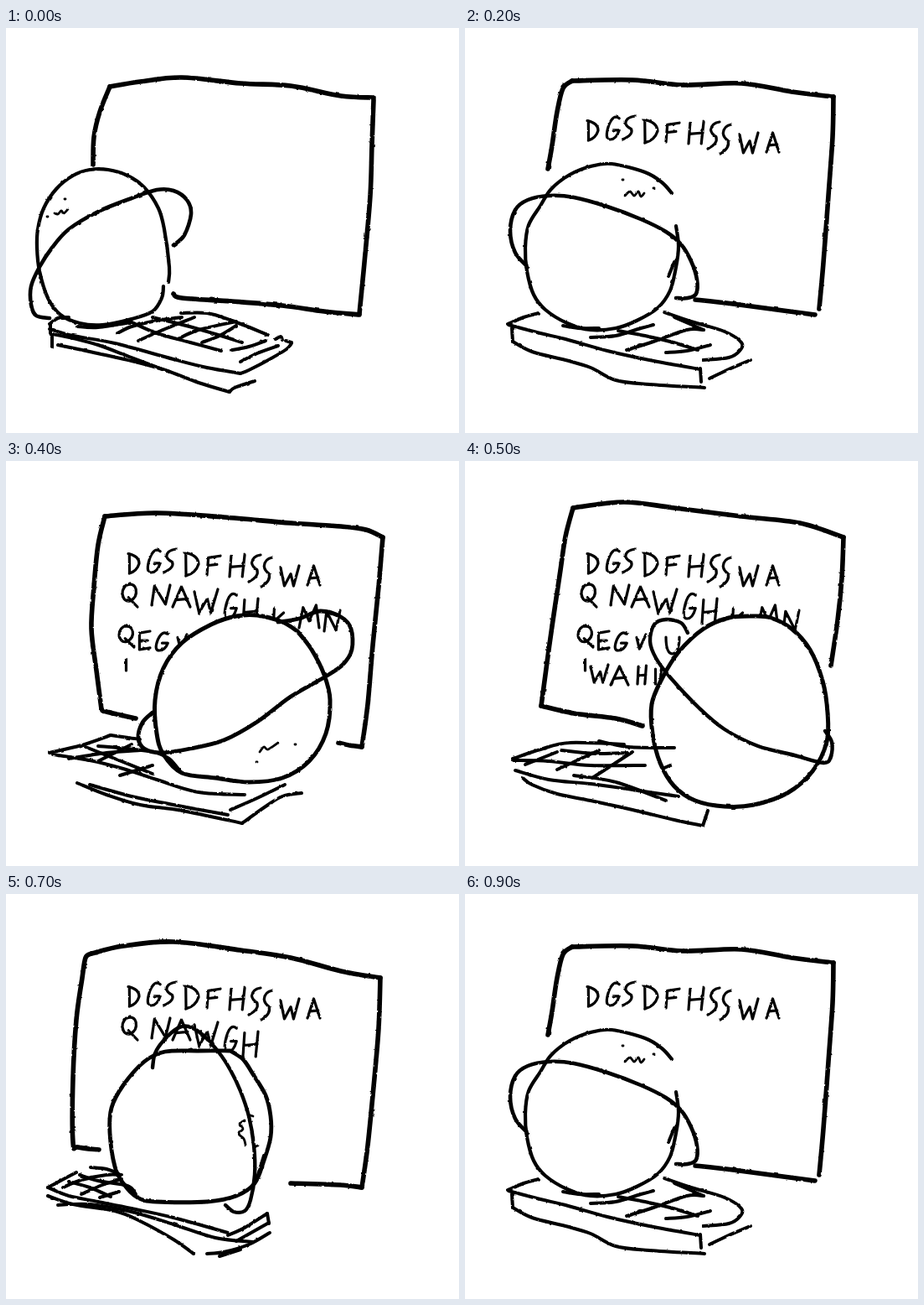
Recreate the animation shown at these times as an HTML page. Size 541 by 483 pixels, loop 1000 ms.

```html
<!DOCTYPE html>
<html lang="en">
<head>
<meta charset="utf-8">
<title>Typing doodle</title>
<style>
html, body { margin: 0; width: 100%; height: 100%; overflow: hidden; background: #fff; }
svg { display: block; width: 100%; height: 100%; }
path { fill: none; stroke: #000; stroke-linecap: round; stroke-linejoin: round; vector-effect: non-scaling-stroke; }
.head { fill: #fff; }
</style>
</head>
<body>
<svg id="stage" viewBox="0 0 541 483" role="img" aria-label="A round figure whirls over a keyboard: DGSDFHSSWA QNAWGHKMN QEGVU IWAHIK">
  <filter id="ink" x="0" y="0" width="541" height="483" filterUnits="userSpaceOnUse">
    <feTurbulence type="fractalNoise" baseFrequency=".16" numOctaves="2" seed="4"/>
    <feDisplacementMap in="SourceGraphic" scale="2.2" xChannelSelector="R" yChannelSelector="G"/>
  </filter>
</svg>
<script>
const NS = 'http://www.w3.org/2000/svg';
const stage = document.getElementById('stage');

// Strokes are runs of points; "|" lifts the pen.
const poses = {
  left: {
    letters: 0, headWidth: 4.2, ringWidth: 4.6,
    screen: `104,163 105,130 112,100 124,70|124,70 160,64 210,59 280,66 340,69 400,81 439,83|
      439,86 437,140 435,200 428,280 422,341|422,342 380,338 330,331 270,326 210,322 200,317`,
    head: `194,303 195,285 189,240 182,215 165,190 145,176 122,169 100,169 80,176 60,192 45,215
      38,240 37,262 40,290 50,322 65,342 88,352 115,354 150,347 175,338 186,322 188,308`,
    ring: `200,259 213,247 221,222 216,205 200,194 180,193 150,203 110,219 75,240 55,262 40,285
      30,308 30,330 36,343 52,346`,
    face: '70,204 71,204|49,225 50,225|58,221 62,222 66,218 69,221 74,216',
    keys: `52,353 62,346 75,345|52,359 80,367 130,376 200,395 240,405 280,412|
      280,412 290,408 315,395 335,383 341,376|53,353 53,364|55,368 55,381|
      62,378 100,386 150,397 190,408 230,423 267,434|267,434 273,429 297,421|
      55,365 80,370 110,378 150,393 195,410|209,340 240,340 270,349 313,366|
      148,350 180,364 220,375 257,385|175,345 215,355 250,365 282,375|133,364 150,356 180,349 210,345|
      158,373 185,361 225,345|205,371 230,360 275,350|234,375 255,367 275,355|
      270,384 290,380 310,373|280,398 300,388 325,379|322,371 328,368 330,372|334,373 341,375|85,356 110,357 150,351`
  },
  up: {
    letters: 10, headWidth: 4.2, ringWidth: 4.6,
    screen: `99,168 104,140 110,100 117,72 128,63|128,63 200,62 260,68 330,66 390,76 440,82|
      440,82 439,130 434,200 428,280 423,335|418,342 380,337 320,329 275,324`,
    head: `247,197 235,184 215,172 175,162 150,165 125,175 103,192 90,212 76,235 72,262 74,290
      82,318 96,336 122,352 150,360 180,358 205,349 230,334 245,313 252,285 255,260 252,236`,
    ring: `252,322 266,322 276,317 277,300 270,278 258,258 240,243 210,228 170,213 130,202 100,200
      75,205 60,217 54,242 60,268 75,285`,
    face: '188,181 189,181|225,191 226,191|191,200 197,195 202,200 207,195 210,201 214,197',
    keys: `51,353 70,345 88,340|52,354 90,364 120,371 170,385 220,396 281,407|56,358 57,374|
      57,374 80,386 120,396 150,405 180,420 220,425 286,429|281,406 282,422|292,418 315,407 341,396|
      238,339 270,350 310,362 330,375 328,385 315,393 285,396|250,345 285,360|117,355 135,358 160,358|
      150,369 180,367 210,358 225,354|183,361 215,367 245,374 278,384|193,384 225,374 265,360 285,360|
      240,387 265,385 293,378|243,296 250,279`
  },
  right: {
    letters: 16, headWidth: 4.8, ringWidth: 4.4,
    screen: `111,305 86,302 80,296 80,220 84,150 91,100 95,76 102,71|
      102,71 140,62 200,57 280,67 340,76 400,92 447,100|
      447,100 445,160 439,230 432,300 425,350|425,350 400,347 340,345`,
    head: `268,187 230,187 190,188 165,200 140,228 126,255 124,285 130,325 140,345 157,362 180,367
      240,367 275,360 297,345 308,318 316,290 316,265 310,240 295,215 283,197 268,187`,
    ring: `262,371 272,379 285,378 292,365 297,335 296,300 290,265 280,235 268,210 255,190 235,168
      218,158 205,160 188,175 178,190 175,207`,
    face: '292,264 295,265|298,301 301,300|285,270 279,274 283,280 278,286 284,292 286,299',
    keys: `84,332 65,342 50,350|50,350 75,360 110,367 150,375 200,386 265,404|101,326 120,328 135,334|
      88,335 110,342 145,348 155,358|75,343 100,350 125,361|68,350 90,341 120,335 138,335|
      90,358 115,347 138,340|112,362 135,355|50,360 80,370 130,378 160,390 200,412 224,429|
      62,371 100,370 150,379 200,394 250,410 295,415|265,407 285,398 312,381|312,381 314,393|
      275,414 314,392|240,429 260,427 290,418 315,404|255,432 280,424|300,338 308,312`
  },
  down: {
    letters: 25, headWidth: 5, ringWidth: 4.8,
    screen: `155,307 120,299 114,296|114,296 108,250 102,200 105,150 110,100 118,66|
      118,66 180,62 260,67 340,74 400,78 430,82 450,91|450,91 445,150 438,220 432,290 425,341|425,341 410,339 397,336`,
    head: `348,203 330,192 300,184 275,185 245,195 210,217 188,247 178,285 180,325 188,350 210,372
      250,378 290,383 330,378 362,358 382,325 387,285 380,255 365,225 348,203`,
    ring: `175,300 163,312 158,330 165,343 185,348 220,343 260,333 300,311 340,281 380,258 402,243
      413,225 412,200 400,186 375,179 350,188 325,192`,
    face: '299,359 300,359|345,338 346,338|303,347 308,341 313,344 325,336',
    keys: `52,348 90,339 125,327|125,327 160,332|56,350 100,357 140,367 180,380 230,395 285,398|
      75,355 120,348 160,345|110,340 145,343 178,347|95,341 130,355 175,373|136,375 175,363|
      110,358 150,338|85,384 120,398 160,410 210,417 282,432|100,386 150,400 200,410 265,422|
      268,416 300,402 333,386|282,432 310,412 330,400 353,396|178,347 195,355 208,370`
  },
  back: {
    letters: 30, headWidth: 5, ringWidth: 4.4,
    screen: `212,316 180,307 130,301 91,292|91,292 98,240 105,190 114,130 120,90 129,56|
      129,56 190,49 250,56 330,66 400,74 452,91|452,91 450,140 445,190 437,244`,
    head: `345,185 315,187 285,200 255,228 235,260 223,290 224,325 233,360 250,388 275,405 310,412
      345,410 385,396 415,370 432,335 433,300 427,262 412,225 390,200 365,187 345,185`,
    ring: `266,205 258,193 240,189 226,195 221,215 228,235 245,258 280,295 310,320 350,340 390,350
      428,360 437,352 438,335 430,322`,
    face: '',
    keys: `57,355 90,344 125,336 190,338|160,334 195,341 250,342|57,357 100,358 150,363 215,363|
      72,362 110,347|110,368 160,345|152,378 200,347|115,345 155,349 195,348|
      60,369 100,380 150,385 200,392 255,400|130,375 180,383 240,405|
      69,378 80,386 110,397 150,405 200,416 250,428 284,435|284,435 290,417|238,366 245,363`
  }
};

// Each glyph fills a unit box.
const glyphs = {
  D: 'M.1 .1L.12 1M0 .1Q1 .2 1 .55Q.8 .9 .1 1',
  G: 'M.9 .1Q.5 -.1 .2 .4Q-.1 1 .3 1Q.7 1 .9 .6L.5 .6',
  S: 'M1 0Q.3 .05 .25 .3Q.3 .45 .7 .55Q.9 .8 0 1',
  F: 'M.1 .1L0 1M.1 .1L1 0M.1 .5L.7 .45',
  H: 'M.1 .05L0 1M.95 0L.8 1M.05 .55L.9 .5',
  W: 'M0 .1L.2 1L.55 .4L.7 1L1 0',
  A: 'M0 1L.5 0L1 1M.2 .65L.85 .6',
  Q: 'M.5 0Q0 .1 0 .45Q.1 .8 .5 .75Q1 .6 .9 .25Q.8 0 .4 .05M.4 .6L1 1',
  N: 'M0 1L.15 .05L.75 .95L1 0',
  K: 'M.1 0L0 1M.9 .2L.1 .6L1 1',
  M: 'M0 1L.2 .1L.5 .7L.85 0L1 1',
  E: 'M.1 .1L.1 1L1 .9M.1 .1L1 0M.1 .5L.8 .5',
  V: 'M0 .2L.3 1L1 0',
  U: 'M0 0Q0 1 .5 1Q1 .9 1 0',
  I: 'M.5 0L.5 1'
};

// letter, x, y, width, height
const rows = [
  'D,146,108,13,26 G,168,105,18,28 S,188,105,15,28 D,213,106,17,31 F,240,113,17,23 H,267,112,19,26 S,290,112,14,32 S,305,115,13,35 W,328,125,22,24 A,360,125,15,23',
  'Q,139,146,18,28 N,174,148,22,24 A,199,150,21,24 W,225,153,28,28 G,260,157,17,31 H,283,164,19,30 K,319,176,14,25 M,350,172,24,27 N,380,178,19,25',
  'Q,135,196,18,26 E,158,203,14,22 G,178,204,17,22 V,205,207,11,17 U,240,210,16,20',
  'I,142,236,3,14 W,150,243,21,21 A,174,245,21,22 H,206,244,11,22 I,226,248,3,18 K,233,248,14,18'
];
const letters = rows.join(' ').split(' ').map(s => s.split(','));

const strokes = text => text.trim().split('|').filter(Boolean)
  .map(s => s.trim().split(/\s+/).map(p => p.split(',').map(Number)));

// Catmull-Rom spline as cubic curves
function spline(pts) {
  const at = i => pts[Math.max(0, Math.min(pts.length - 1, i))];
  const ctrl = (i, j, k, s) => [0, 1].map(n => (at(i)[n] + s * (at(k)[n] - at(j)[n]) / 6).toFixed(1));
  let d = 'M' + pts[0];
  for (let i = 0; i < pts.length - 1; i++) {
    d += `C${ctrl(i, i - 1, i + 1, 1)} ${ctrl(i + 1, i, i + 2, -1)} ${at(i + 1)}`;
  }
  return d;
}

function make(tag, attrs, parent) {
  const el = document.createElementNS(NS, tag);
  for (const k in attrs) el.setAttribute(k, attrs[k]);
  if (parent) parent.append(el);
  return el;
}

function resample(pts, n) {
  const path = make('path', { d: spline(pts) });
  const len = path.getTotalLength();
  return Array.from({ length: n + 1 }, (_, i) => {
    const p = path.getPointAtLength(len * i / n);
    return [p.x, p.y];
  });
}

function blend(a, b) {
  const mix = part => strokes(a[part]).map((s, i) => {
    const u = resample(s, 16), v = resample(strokes(b[part])[i], 16);
    return u.map((p, j) => p.map((c, k) => ((c + v[j][k]) / 2).toFixed(1)).join()).join(' ');
  }).join('|');
  return {
    ...b,
    letters: (a.letters + b.letters) >> 1,
    screen: mix('screen'), head: mix('head'), ring: mix('ring'), face: mix('face')
  };
}
poses.leftUp = blend(poses.left, poses.up);
poses.rightUp = blend(poses.right, poses.up);

function draw(pose) {
  const g = make('g', { filter: 'url(#ink)', opacity: 0 }, stage);
  const ink = (part, width, cls = '') => strokes(pose[part]).forEach(s =>
    make('path', { d: spline(s), 'stroke-width': width, class: cls }, g));
  ink('screen', 5.6);
  for (const [ch, x, y, w, h] of letters.slice(0, pose.letters)) {
    make('path', { d: glyphs[ch], transform: `translate(${x} ${y}) scale(${w} ${h})`, 'stroke-width': 3.2 }, g);
  }
  ink('head', pose.headWidth, 'head');
  ink('keys', 4);
  ink('ring', pose.ringWidth);
  ink('face', 2.8);
  return g;
}

const order = ['left', 'leftUp', 'up', 'right', 'down', 'back', 'down', 'right', 'rightUp', 'up'];
for (const name of new Set(order)) {
  const steps = order.map((n, i) => ({ opacity: +(n === name), offset: i / order.length, easing: 'step-end' }));
  steps.push({ opacity: +(order[0] === name), offset: 1 });
  draw(poses[name]).animate(steps, { duration: 1000, iterations: Infinity });
}
</script>
</body>
</html>
```
